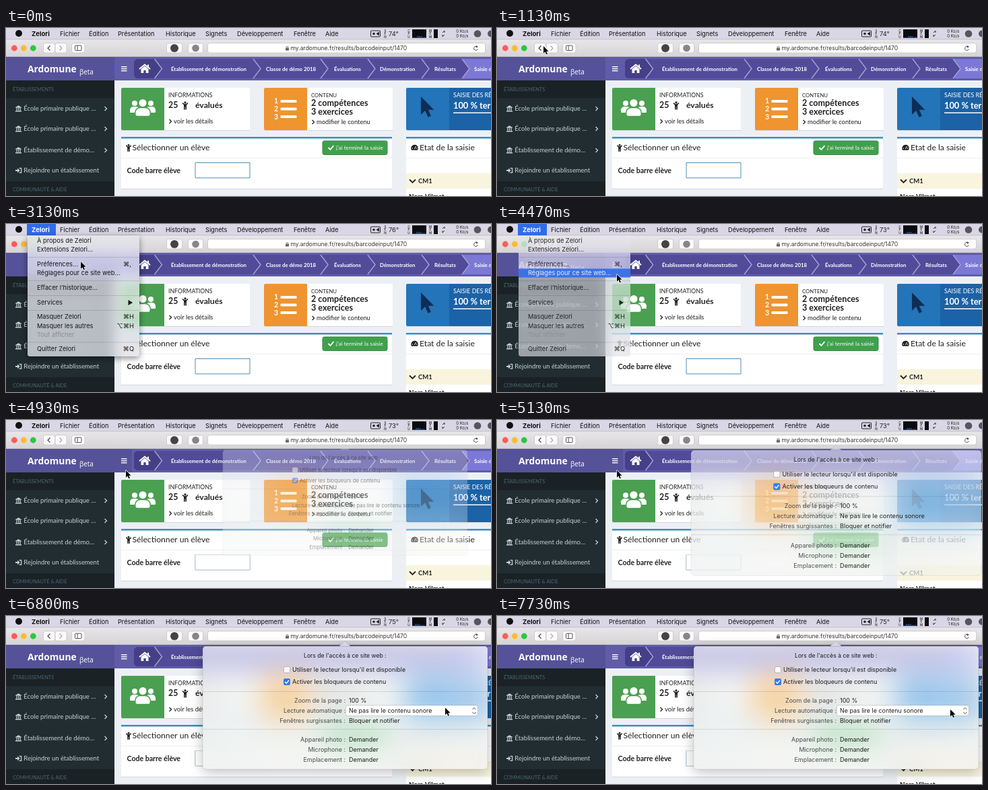
An HTML page with a canvas for the animation above (8 s loop, 720 by 250 pixels).

```html
<!DOCTYPE html>
<html lang="fr">
<head>
<meta charset="utf-8">
<title>Réglages du site</title>
<style>
html, body { margin: 0; width: 100%; height: 100%; overflow: hidden; background: #ecf0f5; }
canvas { display: block; width: 720px; height: 250px; }
</style>
</head>
<body>
<canvas id="stage" width="720" height="250"></canvas>
<script>
const W = 720, H = 250, LOOP = 8000, STEP = 200 / 3;
const UI = "Inter, 'DejaVu Sans', sans-serif", WEB = "Lato, 'Open Sans', sans-serif";
const BRAND = 'Ardomune', APP = 'Zelori';
const screen = document.getElementById('stage').getContext('2d');
let g = screen;

// Drawing helpers; text is centred vertically on y
function text(s, x, y, size, color = '#222', font = WEB, weight = 400, align = 'left') {
  g.font = `${weight} ${size}px ${font}`;
  g.textAlign = align;
  g.fillStyle = color;
  g.fillText(s, x, y + size * 0.35);
}
function rect(x, y, w, h, color) {
  g.fillStyle = color;
  g.fillRect(x, y, w, h);
}
function round(x, y, w, h, r, fill, stroke) {
  g.beginPath();
  g.roundRect(x, y, w, h, r);
  if (fill) { g.fillStyle = fill; g.fill(); }
  if (stroke) { g.strokeStyle = stroke; g.lineWidth = 1; g.stroke(); }
}
function disc(x, y, r, color) {
  g.beginPath();
  g.arc(x, y, r, 0, 7);
  g.fillStyle = color;
  g.fill();
}
function trace(pts) {
  g.beginPath();
  pts.forEach(([x, y]) => g.lineTo(x, y));
}
function poly(pts, color) {
  trace(pts);
  g.closePath();
  g.fillStyle = color;
  g.fill();
}
function line(pts, color, width = 1) {
  trace(pts);
  g.strokeStyle = color;
  g.lineWidth = width;
  g.stroke();
}
function chevron(x, y, s, color, width = 1.3) {
  line([[x, y - s], [x + s, y], [x, y + s]], color, width);
}
function layer(draw) {
  const c = document.createElement('canvas');
  c.width = W;
  c.height = H;
  const prev = g;
  g = c.getContext('2d');
  draw();
  g = prev;
  return c;
}

// Icons
function person(x, y, s, color) {
  disc(x, y - 4.2 * s, 1.5 * s, color);
  line([[x - 3.6 * s, y - 3.6 * s], [x - 1.4 * s, y - 1.4 * s], [x + 1.4 * s, y - 1.4 * s], [x + 3.6 * s, y - 3.6 * s]], color, 1.5 * s);
  rect(x - 1.8 * s, y - 2 * s, 3.6 * s, 3.6 * s, color);
  rect(x - 1.8 * s, y + 1.4 * s, 1.5 * s, 4 * s, color);
  rect(x + 0.3 * s, y + 1.4 * s, 1.5 * s, 4 * s, color);
}
function bank(x, y, color) {
  poly([[x, y - 2], [x + 4.5, y - 4.8], [x + 9, y - 2], [x + 9, y - 1.2], [x, y - 1.2]], color);
  for (let i = 0; i < 3; i++) rect(x + 1.3 + i * 2.6, y - 0.8, 1.3, 3.4, color);
  rect(x, y + 3, 9, 1.5, color);
}
function enter(x, y, color) {
  rect(x, y - 1, 4, 2, color);
  poly([[x + 3, y - 3.4], [x + 6.6, y], [x + 3, y + 3.4]], color);
  line([[x + 5.5, y - 3.4], [x + 8.6, y - 3.4], [x + 8.6, y + 3.4], [x + 5.5, y + 3.4]], color, 1.3);
}
function users(x, y) {
  const c = '#fff', back = '#4a9f50';
  for (const d of [-12, 12]) {
    disc(x + d, y - 6, 4, c);
    round(x + d - 7, y - 1, 14, 9, [5, 5, 1, 1], c);
  }
  disc(x, y - 6.5, 6.7, back);
  round(x - 12, y, 24, 15, [8, 8, 3, 3], back);
  disc(x, y - 6.5, 5.5, c);
  round(x - 10.5, y + 1.2, 21, 11.5, [7, 7, 2, 2], c);
}
function home(x, y) {
  line([[x - 8, y + 0.5], [x, y - 6], [x + 8, y + 0.5]], '#fff', 2);
  rect(x + 4, y - 6, 2, 4, '#fff');
  poly([[x - 5.5, y + 0.5], [x, y - 4], [x + 5.5, y + 0.5], [x + 5.5, y + 6.5], [x + 1.7, y + 6.5], [x + 1.7, y + 2.5], [x - 1.7, y + 2.5], [x - 1.7, y + 6.5], [x - 5.5, y + 6.5]], '#fff');
}
function gauge(x, y) {
  g.beginPath();
  g.arc(x, y, 5.3, 2.6, 0.54);
  g.closePath();
  g.fillStyle = '#222';
  g.fill();
  line([[x, y + 1], [x + 2, y - 3]], '#fff', 1);
  for (const d of [-3.2, 3.2]) disc(x + d, y, 0.7, '#fff');
}
function hamburger() {
  for (let i = 0; i < 3; i++) rect(171, 57 + i * 3, 8.5, 1.4, '#fff');
}
function check(x, y, s, color, width) {
  line([[x - s, y], [x - s * 0.25, y + s * 0.75], [x + s, y - s * 0.75]], color, width);
}
const ARROW = [[0, 0], [0, 11.2], [2.6, 8.8], [4.4, 12.8], [6.2, 12], [4.5, 8.2], [8, 8.2]];
const arrow = (x, y, s) => ARROW.map(([a, b]) => [x + a * s, y + b * s]);

// Sidebar rows
const LINKS = [
  [120, 'École primaire publique …', 9.5],
  [150, 'École primaire publique …', 9.5],
  [182, 'Établissement de démo…', 9.6],
  [212, 'Rejoindre un établissement', 9.45]
];
function link(i, hot) {
  const [y, label, size] = LINKS[i], c = hot ? '#fff' : '#c3d1d8';
  if (hot) {
    rect(0, y - 15, 161, 30, '#1e282c');
    rect(0, y - 15, 2, 30, '#605ca8');
  }
  if (i < 3) {
    bank(14, y, c);
    chevron(146.5, y, 3, c);
  } else enter(14, y, c);
  text(label, 26.3, y, size, c);
}

const CRUMBS = [
  [245, 'Établissement de démonstration', 378],
  [386, 'Classe de démo 2018', 478],
  [487, 'Évaluations', 548],
  [555, 'Démonstration', 628],
  [636, 'Résultats', 688],
  [695, 'Saisie de code barre', 800]
];
function crumbs() {
  round(190, 46, 560, 29, 6, '#514b9a');
  poly([[677, 46], [720, 46], [720, 75], [677, 75], [688, 60.5]], '#7c79d6');
  round(190, 46, 31, 29, [6, 0, 0, 6], '#453f88');
  poly([[220, 46], [232, 60.5], [220, 75]], '#453f88');
  home(206, 60.5);
  for (const x of [231.5, ...CRUMBS.map(c => c[2])])
    line([[x - 11, 46], [x, 60.5], [x - 11, 75]], '#a39fd2', 1.5);
  for (const [x, s] of CRUMBS) text(s, x, 61, 7.8, '#fff', WEB, 700);
}
function card(x, w, color) {
  rect(x, 152, w, 1, '#d3d8de');
  round(x, 89, w, 63, 2, '#fff');
  round(x, 89, 64, 63, [2, 0, 0, 2], color);
}
function panel(x, w, h) {
  rect(x, 163 + h, w, 1, '#d3d8de');
  round(x, 163, w, h, 2, '#fff');
  rect(x, 162, w, 2.5, '#3c8dbc');
  rect(x, 193, w, 1, '#f0f0f0');
}
function field(focused) {
  round(281, 200.5, 81, 22.5, 0, '#fff', focused ? '#4a8fb5' : '#d2d6de');
}

function drawPage() {
  rect(0, 0, W, H, '#ecf0f5');
  // Browser toolbar
  const bar = g.createLinearGradient(0, 17, 0, 43);
  bar.addColorStop(0, '#e9e6e9');
  bar.addColorStop(1, '#d6d3d6');
  rect(0, 0, W, 43, bar);
  rect(0, 42.5, W, 0.8, '#a9a6ab');
  ['#fc5b57', '#fdbc2e', '#28c940'].forEach((c, i) => disc(12.3 + i * 14, 30, 4.4, c));
  for (const [x, w] of [[55.5, 17], [73, 17], [97.5, 19.5], [238.5, 23], [270.5, 22]])
    round(x, 22.5, w, 14.5, 3, '#fbfafb', '#cfccd0');
  line([[65.5, 26.5], [62, 30], [65.5, 33.5]], '#444', 1.2);
  chevron(79.5, 30, 3.5, '#aaa', 1.2);
  round(102.5, 26, 9.5, 7.5, 1, null, '#555');
  line([[106, 26], [106, 33.5]], '#555');
  disc(250, 30, 6, '#444');
  disc(281.5, 30, 5.3, '#85858a');
  round(299.5, 22.5, 412, 14.5, 3, '#fff', '#cfccd0');
  round(415, 29.4, 5, 4, 0.6, '#666');
  g.beginPath();
  g.arc(417.5, 29.2, 1.6, Math.PI, 0);
  g.strokeStyle = '#666';
  g.stroke();
  text(`my.${BRAND.toLowerCase()}.fr/results/barcodeinput/1470`, 422.5, 30, 8.55, '#333', UI);
  g.beginPath();
  g.arc(697.5, 30.3, 3, 0.3, 5.4);
  g.strokeStyle = '#555';
  g.stroke();
  poly([[697.8, 25.8], [701, 28], [697.8, 29.8]], '#555');

  // Header and sidebar
  rect(161, 43, W, 35, '#605ca8');
  rect(0, 43, 161, 35, '#555299');
  text(BRAND, 32, 61, 13.8, '#fff', "'Open Sans', sans-serif", 700);
  text('βeta', 109, 66, 9.9, '#fff', "'Open Sans', sans-serif");
  hamburger();
  crumbs();
  rect(0, 78, 161, 172, '#222d32');
  rect(0, 78, 161, 26.5, '#1a2226');
  rect(0, 228, 161, 22, '#1a2226');
  text('ÉTABLISSEMENTS', 10, 91.5, 7.4, '#4b646f');
  text('COMMUNAUTÉ & AIDE', 10, 240, 7.4, '#4b646f');
  LINKS.forEach((_, i) => link(i, false));

  // Cards
  card(171, 191, '#4a9f50');
  users(203, 118);
  text('INFORMATIONS', 241, 100, 8.7);
  text('25', 241, 115, 12.3, '#222', WEB, 700);
  person(266, 115.5, 1.1, '#222');
  text('évalués', 281, 115, 12.2, '#222', WEB, 700);
  chevron(242.5, 139, 3, '#222');
  text('voir les détails', 249, 139, 9.4);

  card(383, 191, '#ef942f');
  for (let i = 0; i < 3; i++) {
    text(i + 1, 398, 108.5 + i * 12, 10.5, '#fff', WEB, 700);
    round(407.5, 107 + i * 11.5, 24, 4, 1, '#fff');
  }
  text('CONTENU', 453, 100, 7.8);
  text('2 compétences', 453, 111.5, 12.6, '#222', WEB, 700);
  text('3 exercices', 453, 125, 12.6, '#222', WEB, 700);
  chevron(454.5, 140, 3, '#222');
  text('modifier le contenu', 461, 140, 9.4);

  card(594, 130, '#2374b8');
  rect(658, 89, 62, 63, '#1c62a6');
  poly(arrow(616, 102, 2.4), '#0e2d55');
  text('SAISIE DES RÉSULTATS', 664, 100, 8.8, '#fff');
  text('100 % terminé', 664, 115.5, 12.8, '#fff', WEB, 700);
  rect(664, 125.5, 60, 1.5, '#fff');

  // Panels
  panel(171, 402, 76);
  person(182, 178.5, 1, '#222');
  text('Sélectionner un élève', 187.5, 178, 12.2);
  round(470, 168, 96, 20.5, 2.5, '#41a04c', '#358a40');
  check(482.5, 178, 4, '#fff', 1.8);
  text("j'ai terminé la saisie", 490, 178, 8.3, '#fff');
  text('Code barre élève', 179.5, 212, 10.6, '#222', WEB, 700);
  field(true);

  panel(594, 140, 100);
  gauge(606.5, 179);
  text('Etat de la saisie', 614, 178, 12.2);
  rect(594, 216, 126, 23, '#f8f4de');
  line([[599, 225.5], [603.5, 230], [608, 225.5]], '#222', 1.8);
  text('CM1', 612, 228, 9.5, '#222', WEB, 700);
  text('Nora Vilmet', 598, 250.5, 9.8, '#222', WEB, 700);
}

// System bar; its gauges refresh every two seconds
const noise = n => { const v = Math.sin(n * 12.9898) * 43758.5453; return v - Math.floor(v); };
const TITLES = [[80, 'Fichier'], [123, 'Édition'], [166, 'Présentation'], [237, 'Historique'],
  [296, 'Signets'], [343, 'Développement'], [427, 'Fenêtre'], [474, 'Aide']];
function stacked(s, x) {
  [...s].forEach((c, i) => text(c, x, 4 + i * 4.6, 4.6, '#222', UI, 500, 'center'));
}
function systemBar(t, open) {
  const tick = Math.floor(t / 2000);
  rect(0, 0, W, 17, '#d9d6e5');
  rect(0, 16.5, W, 0.7, '#b9b6bd');
  disc(19, 8, 5, '#111');
  if (open) rect(31, 0, 43, 17, '#2f6ceb');
  text(APP, 38, 8.5, 9.5, open ? '#fff' : '#111', UI, 700);
  for (const [x, s] of TITLES) text(s, x, 8.5, 9.2, '#111', UI);
  round(541.5, 4, 14, 9, 1, null, '#222');
  disc(546, 8.5, 1.8, '#222');
  poly([[549.5, 8.5], [554, 5.5], [554, 11.5]], '#222');
  stacked('SEN', 563);
  text([74, 76, 73, 75][tick] + '°', 568, 8.5, 9.3, '#222', UI);
  stacked('CPU', 598);
  rect(603, 2, 21, 13, '#0b0b0e');
  for (let i = 0; i < 20; i++) {
    const h = 0.5 + 3 * noise(i + tick + 3) ** 3;
    rect(603.5 + i, 15 - h, 1, h, '#3d6fb0');
  }
  stacked('MEM', 630);
  rect(635, 2, 6, 13, '#0b0b0e');
  line([[648, 7], [651, 4], [651, 7]], '#333');
  line([[648, 10], [648, 13], [651, 10]], '#333');
  text('0 Ko/s', 686.5, 5, 6, '#222', UI, 400, 'right');
  text((tick > 2 ? 1 : 0) + ' Ko/s', 686.5, 12, 6, '#222', UI, 400, 'right');
  disc(700, 8.5, 5.3, '#55555a');
  disc(720, 8.5, 5, '#55555a');
}

// Drop-down menu
const ITEMS = [
  [25, 'À propos de ' + APP], [38, 'Extensions ' + APP + '…'],
  [60, 'Préférences…', '⌘,'], [73, 'Réglages pour ce site web…'],
  [95, 'Effacer l’historique…'], [117, 'Services'],
  [138, 'Masquer ' + APP, '⌘H'], [152, 'Masquer les autres', '⌥⌘H'],
  [165, 'Tout afficher'], [186, 'Quitter ' + APP, '⌘Q']
];
function frost(img, blur, tint) {
  g.filter = `blur(${blur}px) saturate(1.8)`;
  g.drawImage(img, 0, 0);
  g.filter = 'none';
  rect(0, 0, W, H, tint);
}
function menu(alpha, hoverY) {
  const shape = () => {
    g.beginPath();
    g.roundRect(32, 17, 166, 180, [0, 0, 4, 4]);
  };
  g.save();
  g.globalAlpha = alpha;
  if (alpha === 1) {
    g.save();
    g.shadowColor = 'rgba(0,0,0,.45)';
    g.shadowBlur = 10;
    g.shadowOffsetY = 3;
    shape();
    g.fillStyle = '#c6c6ca';
    g.fill();
    g.restore();
  }
  g.save();
  shape();
  g.clip();
  g.drawImage(menuGlass, 0, 0);
  g.restore();
  g.globalAlpha = Math.sqrt(alpha);
  for (const y of [49, 84, 106, 128, 175.5]) rect(32, y, 166, 1, 'rgba(0,0,0,.13)');
  for (const [y, label, keys] of ITEMS) {
    const off = y === 165, hot = !off && Math.abs(hoverY - y) < 6.6;
    if (hot) rect(32, y - 6.5, 166, 13, '#2f6ceb');
    const c = hot ? '#fff' : off ? '#8d8d92' : '#161618';
    text(label, 46, y, 9.25, c, UI);
    if (keys) text(keys, keys === '⌘,' ? 186 : 190, y, 9.3, c, UI, 400, 'right');
    if (y === 117) poly([[181.5, 113], [188, 117], [181.5, 121]], c);
  }
  g.restore();
}

// Site settings popover
const ROWS = [
  [126, 'Zoom de la page :', '100 %'],
  [141, 'Lecture automatique :', 'Ne pas lire le contenu sonore'],
  [156, 'Fenêtres surgissantes :', 'Bloquer et notifier'],
  [184, 'Appareil photo :', 'Demander'],
  [199, 'Microphone :', 'Demander'],
  [214, 'Emplacement :', 'Demander']
];
function bubble() {
  g.beginPath();
  g.roundRect(292, 45, 423, 183, 5);
  g.moveTo(494, 45.5);
  g.lineTo(503, 38);
  g.lineTo(512, 45.5);
  g.closePath();
}
function popover(scale, glass, ink, settled, hover) {
  g.save();
  g.translate(503, 41);
  g.scale(scale, scale);
  g.translate(-503, -41);
  g.globalAlpha = glass;
  if (settled) {
    g.save();
    g.shadowColor = 'rgba(0,0,0,.26)';
    g.shadowBlur = 20;
    g.shadowOffsetY = 4;
    bubble();
    g.fillStyle = '#f0f0f2';
    g.fill();
    g.restore();
  }
  g.save();
  bubble();
  g.clip();
  g.drawImage(popGlass, 0, 0);
  g.restore();
  bubble();
  g.strokeStyle = 'rgba(0,0,0,.15)';
  g.lineWidth = 0.6;
  g.stroke();

  g.globalAlpha = ink;
  const size = 8.95, dark = '#1c1c1e';
  text("Lors de l'accès à ce site web :", 503.3, 58.5, 8.6, dark, UI, 400, 'center');
  round(412.5, 75.5, 9, 9, 2, '#fff', '#b4b4b8');
  text("Utiliser le lecteur lorsqu'il est disponible", 425, 80, size, dark, UI);
  round(412, 93, 10, 10, 2.2, '#2f7bf0');
  check(417, 98, 3, '#fff', 1.5);
  text('Activer les bloqueurs de contenu', 425, 98, size, dark, UI);
  for (const y of [112, 168]) rect(292, y, 423, 0.8, 'rgba(0,0,0,.14)');
  for (const [y, label, value] of ROWS) {
    text(label, 504, y, size, '#4a4a4d', UI, 400, 'right');
    if (hover && Math.abs(hover[1] + 1 - y) < 7.5) {
      round(504.5, y - 8, 196, 15.5, 2.5, '#fff', 'rgba(0,0,0,.16)');
      line([[692.5, y - 2], [695, y - 4.5], [697.5, y - 2]], '#444');
      line([[692.5, y + 2], [695, y + 4.5], [697.5, y + 2]], '#444');
    }
    text(value, 509, y, size, dark, UI);
  }
  g.restore();
}

// Pointer route: time, x, y, easing towards this point
const linear = p => p, out = p => 1 - (1 - p) ** 2, both = p => p * p * (3 - 2 * p);
const ROUTE = [
  [533, 172, 250], [1133, 69, 27, out],
  [1333, 69, 27], [1600, 54, 7, both],
  [2867, 54, 7], [3133, 111, 56, linear], [3667, 178, 75, out],
  [5533, 178, 75], [5933, 431, 101, both], [6400, 600, 136, out],
  [6600, 600, 136], [7000, 704, 137, both],
  [7200, 704, 137], [7467, 690, 152, both], [7733, 673, 139, both]
];
function pointer(t) {
  const i = ROUTE.findIndex(k => k[0] > t);
  if (i === 0) return ROUTE[0].slice(1);
  if (i < 0) return ROUTE[ROUTE.length - 1].slice(1, 3);
  const [t0, x0, y0] = ROUTE[i - 1], [t1, x1, y1, ease = linear] = ROUTE[i];
  const p = ease((t - t0) / (t1 - t0));
  return [x0 + (x1 - x0) * p, y0 + (y1 - y0) * p];
}
function drawPointer([x, y]) {
  const pts = arrow(x, y, 0.95);
  g.lineJoin = 'round';
  trace(pts);
  g.closePath();
  g.strokeStyle = '#fff';
  g.lineWidth = 1.3;
  g.stroke();
  poly(pts, '#000');
  g.lineJoin = 'miter';
}

const clamp = v => Math.max(0, Math.min(1, v));
const page = layer(drawPage);
const menuGlass = layer(() => frost(page, 9, 'rgba(228,228,234,.78)'));
const popGlass = layer(() => frost(page, 20, 'rgba(238,240,237,.66)'));

function render(t) {
  const pos = pointer(t), [x, y] = pos;
  const fade = 1 - clamp((t - 4410) / 300);
  const open = t > 1990 && fade > 0;
  g.drawImage(page, 0, 0);
  if (t < 1400 && x < 161) {
    const i = LINKS.findIndex(l => Math.abs(y - l[0]) < 15);
    if (i >= 0) link(i, true);
  }
  if (!open && x > 161 && x < 190 && y > 43 && y < 78) {
    rect(161, 43, 26, 35, '#555299');
    hamburger();
  }
  systemBar(t, open && t < 4600);
  if (open) {
    const blink = t > 4320 && t < 4390;
    menu(fade, blink ? -99 : pointer(t - 40)[1]);
  }
  if (t > 4730) {
    field(false);
    const grow = both(clamp((t - 4730) / 300)), settle = both(clamp((t - 5030) / 200));
    const scale = 0.3 + 0.74 * grow - 0.04 * settle;
    popover(scale, clamp((t - 4730) / 520), clamp((t - 4730) / 420), t > 5190, x > 504 && t > 6000 ? pos : null);
  }
  drawPointer(pos);
}

function loop() {
  const t = Math.min(performance.now() % LOOP, LOOP - 5);
  render(Math.floor((t + 4) / STEP) * STEP);
  requestAnimationFrame(loop);
}
loop();
</script>
</body>
</html>
```
